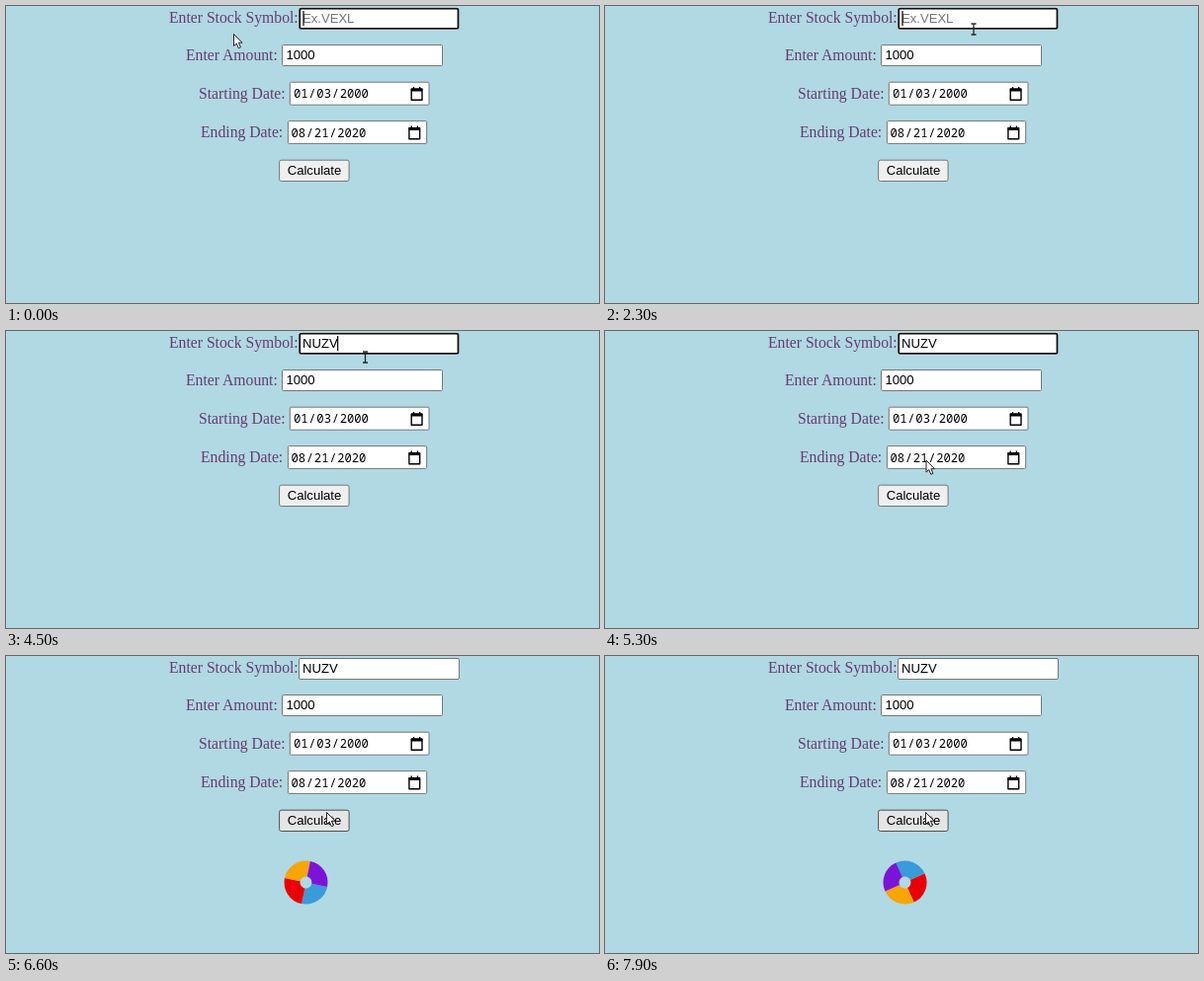
An HTML page for the animation above (8000 ms loop, 600 px wide and 301 px high).

```html
<!DOCTYPE html>
<html lang="en">
<head>
<meta charset="utf-8">
<style>
html, body { margin: 0; width: 100%; height: 100%; overflow: hidden; background: #b0d9e3; }
svg { display: block; }
text { white-space: pre; }
.label { font: 15.7px "Liberation Serif", serif; fill: #673b73; }
.value { font: 13.1px "Liberation Sans", sans-serif; fill: #000; }
.date { font: 12.2px "Noto Sans Mono", monospace; fill: #000; }
.box { fill: #fff; stroke: #767676; }
</style>
</head>
<body>
<svg width="600" height="301" viewBox="0 0 600 301">
  <defs>
    <g id="calendar">
      <path d="M1.2 3.2H12V14.2H1.2Z" fill="none" stroke="#000" stroke-width="1.4" stroke-linejoin="round"/>
      <path d="M.9 2.5H12.3V5.6H.9ZM2.8 1H4.2V3H2.8ZM9 1H10.4V3H9Z"/>
    </g>
  </defs>

  <text class="label" x="165" y="17">Enter Stock Symbol:</text>
  <rect class="box" id="symbol" x="296.5" y="2.5" width="162" height="21" rx="1.5"/>
  <g id="ring" fill="#fff">
    <rect x="296" y="1.3" width="162.7" height="22.9" rx="3"/>
    <rect x="297.2" y="2.6" width="160.3" height="20.3" rx="1.5" stroke="#101010" stroke-width="1.8"/>
  </g>
  <text class="value" id="entry" x="300" y="17"></text>
  <path id="caret" stroke="#000" stroke-width="1.2"/>

  <text class="label" x="182" y="55">Enter Amount:</text>
  <rect class="box" x="279.5" y="39.5" width="162" height="21" rx="1"/>
  <text class="value" x="283.5" y="54">1000</text>

  <text class="label" x="195" y="94">Starting Date:</text>
  <rect class="box" x="287.3" y="77.2" width="140.7" height="23" rx="1"/>
  <text class="date" x="291" y="93" dx="0 0 .7 .7 0 .7 .7">01/03/2000</text>
  <use href="#calendar" x="409" y="81"/>

  <text class="label" x="197" y="133">Ending Date:</text>
  <rect class="box" x="285.4" y="116.6" width="140.3" height="22.8" rx="1"/>
  <text class="date" x="288.5" y="132.5" dx="0 0 .7 .7 0 .7 .7">08/21/2020</text>
  <use href="#calendar" x="406.7" y="120.5"/>

  <rect class="box" id="button" x="276.6" y="156.2" width="70.5" height="21.3" rx="2"/>
  <text class="value" x="284.7" y="171">Calculate</text>

  <g id="spinner" fill="none" stroke-width="16"></g>

  <path id="arrow" d="M.5 .5V12.6L3.3 10L5.3 14.8L7.4 13.9L5.4 9.2H9Z" fill="#fff" stroke="#222" stroke-width="1"/>
  <path id="beam" d="M-2.5 -5.5H-.8L0 -5L.8 -5.5H2.5M0 -5V5M-2.5 5.5H-.8L0 5L.8 5.5H2.5" fill="none" stroke="#1c282c" stroke-width="1.3"/>
</svg>
<script>
const LOOP = 8000, STEP = 100;
const BLUR = 5700, LOADING = 5800;
const WORD = "NUZV", HINT = "Ex.VEXL";
const keyTimes = [3900, 4200, 4300, 4400];
const caretOff = [[800, 1300], [1800, 2300], [2800, 3300], [3800, 3900], [4900, 5400], [BLUR, LOOP]];
// time, x, y of the pointer
const path = [
  [0, 230, 28], [900, 230, 28], [1800, 373, 21], [2000, 373, 23.5], [2300, 373, 23.5],
  [2400, 367, 24], [2500, 367, 24], [2600, 363.5, 26.5], [5000, 363.5, 26.5],
  [5300, 324.5, 130.5], [5500, 324, 158], [LOOP, 324, 158]
];
const $ = id => document.getElementById(id);
const show = (el, on) => el.style.display = on ? "" : "none";
const set = (el, attrs) => Object.entries(attrs).forEach(([k, v]) => el.setAttribute(k, v));

$("spinner").innerHTML = ["#3a9bd8", "#ea0004", "#f8a506", "#7c14d8"].map((color, i) =>
  `<circle r="14" pathLength="4" stroke="${color}" stroke-dasharray="1 3" transform="rotate(${i * 90})"/>`).join("");

function pointerAt(t) {
  const i = path.findIndex(p => p[0] > t);
  const [t0, x0, y0] = path[i - 1], [t1, x1, y1] = path[i];
  const k = (t - t0) / (t1 - t0), e = k * k * (3 - 2 * k);
  return [x0 + (x1 - x0) * e, y0 + (y1 - y0) * e];
}

function draw(t) {
  const typed = WORD.slice(0, keyTimes.filter(k => k <= t).length);
  const entry = $("entry");
  entry.textContent = typed || HINT;
  entry.style.fill = typed ? "#000" : "#757575";

  show($("ring"), t < BLUR);
  const caretX = typed ? 300 + entry.getComputedTextLength() : 301;
  set($("caret"), { d: `M${caretX} 5V20` });
  show($("caret"), !caretOff.some(([a, b]) => t >= a && t < b));

  const [x, y] = pointerAt(t), overText = x > 297 && y < 30;
  for (const id of ["arrow", "beam"]) {
    set($(id), { transform: `translate(${x} ${y})` });
    show($(id), overText === (id === "beam"));
  }
  $("button").style.cssText = y > 156 ? "fill:#e5e5e5;stroke:#4f4f4f" : "fill:#efefef";

  set($("spinner"), { transform: `translate(303.5 229.5) rotate(${(t - 6100) * .18 - 78.5})` });
  show($("spinner"), t >= LOADING);
}

const start = performance.now();
function tick() {
  const t = (performance.now() - start) % LOOP;
  draw(Math.floor(t / STEP) * STEP);
  requestAnimationFrame(tick);
}
tick();
</script>
</body>
</html>
```
